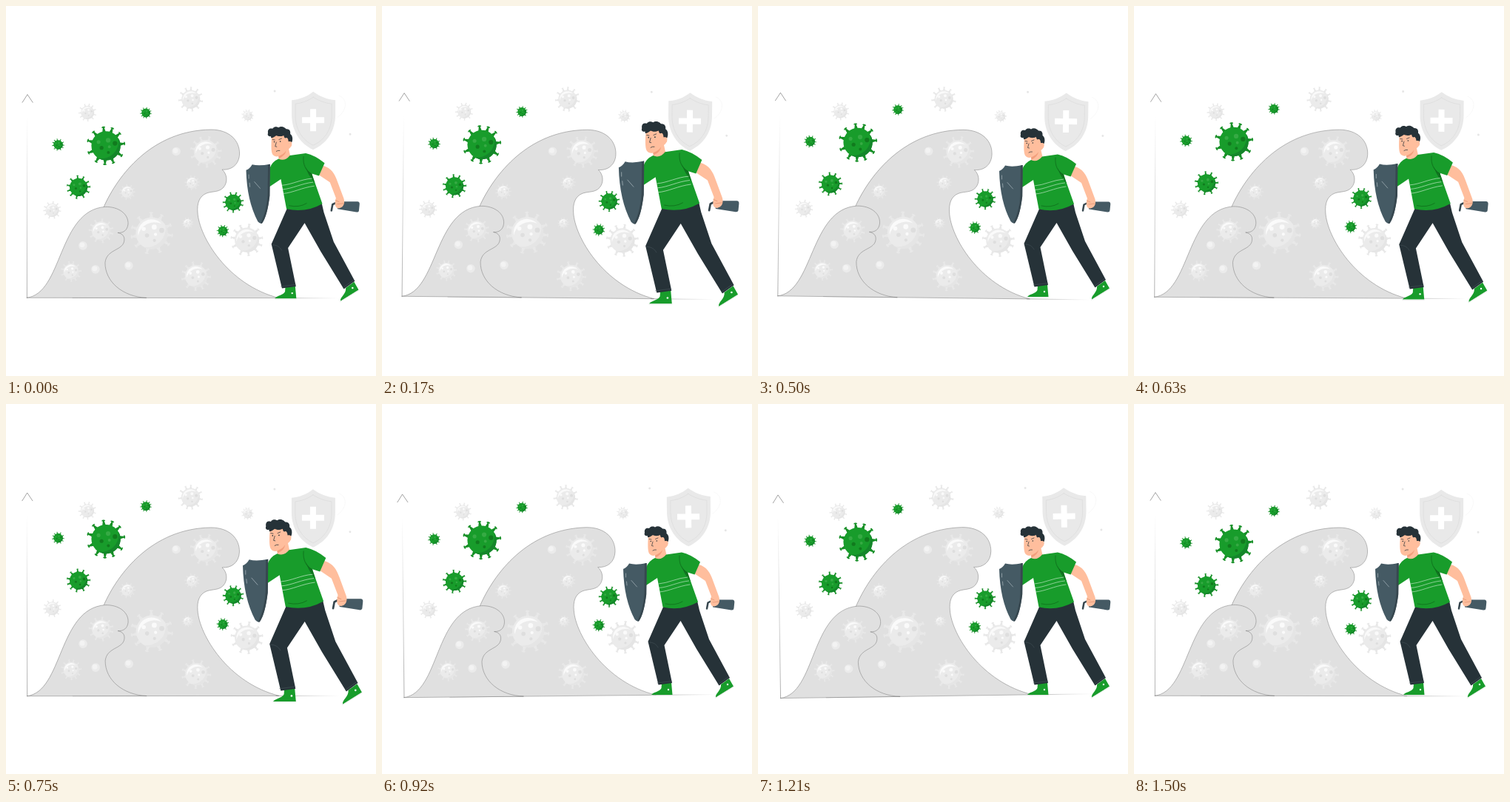
An HTML page for the animation above (1.54 s loop, 500x500 px).

```html
<!DOCTYPE html>
<html lang="en">
<head>
<meta charset="utf-8">
<title>Facing the wave</title>
<style>
html, body { margin: 0; width: 100%; height: 100%; overflow: hidden; background: #fff; }
svg { display: block; width: 100vw; height: 100vh; }
.line { fill: none; stroke-linecap: round; stroke-linejoin: round; }
</style>
</head>
<body>
<svg viewBox="0 0 500 500">
  <defs>
    <linearGradient id="fadeY" gradientUnits="userSpaceOnUse" x1="0" y1="150" x2="0" y2="394">
      <stop offset="0" stop-color="#777" stop-opacity="0"/>
      <stop offset="1" stop-color="#777"/>
    </linearGradient>
    <linearGradient id="fadeX" gradientUnits="userSpaceOnUse" x1="365" y1="0" x2="450" y2="0">
      <stop offset="0" stop-color="#777"/>
      <stop offset="1" stop-color="#888" stop-opacity="0"/>
    </linearGradient>
  </defs>

  <g id="scene">
    <g id="badge">
      <path fill="#e9e9e9" d="M415 115.500C407 122 397 126 386 127V147C386 169 398 186 415 194C433 186 445 169 445 147V127C434 126 424 122 415 115.500Z"/>
      <path class="line" stroke="#d9d9d9" stroke-width=".6" d="M415 123C408 128 400 131 391 132V148C391 166 400 181 415 188C431 181 440 166 440 148V132C431 131 423 128 415 123Z"/>
      <path fill="#fff" d="M411 139h8v11h11v8h-11v11h-8v-11h-11v-8h11Z"/>
      <path class="line" stroke="#f5f5f5" stroke-width=".7" d="M450 121C463 126 460 142 448 150"/>
      <circle cx="363" cy="115" r="1.500" fill="#e6e6e6"/>
      <circle cx="465" cy="173" r="1.500" fill="#e6e6e6"/>
    </g>
    <g id="airGerms"></g>
    <g fill="#e0e0e0" stroke="#777" stroke-width=".5" stroke-linejoin="round">
      <path d="M132 272C151 229 197 168 277 167C302 167 316 182 315.500 200C315 214 305 222 292 221C299 227 300 238 294 245C288 252 279 250 271 253C261 257 258 267 259 279C261 312 300 377 369 394.500H90Z"/>
      <path d="M28 394.500C77 389 70 276 134 271.500C152 271 166 281 165 295C164 303 159 307 151 306.500C159 308 161 313 159.500 319C156 331 136 329 134 347C134 373 158 393 190 394.500Z"/>
    </g>
    <g class="line" stroke-width=".6">
      <path stroke="url(#fadeY)" d="M28.400 150L28.500 394.500"/>
      <path stroke="url(#fadeX)" d="M365 394.500L450 394.600"/>
      <path stroke="#666" d="M22 130.500L28.800 119.800L36 130.500"/>
    </g>
    <g id="waveGerms"></g>
  </g>

  <g id="greenGerms"></g>

  <g id="man">
    <!-- shoes and trousers -->
    <path fill="#189c2b" d="M378 377L391 376.500L392.500 393H364C367 389 375 389 377.500 384Z"/>
    <path fill="#189c2b" d="M458 379L469 371L475 381.500L451 396.500C450 391 459 387 458 379Z"/>
    <path class="line" stroke="#dfe5e0" stroke-width=".8" d="M364 393.800H392.500M450.500 397.300L475 382.300"/>
    <circle cx="387" cy="386" r="1.200" fill="#fff"/>
    <circle cx="467" cy="379" r="1.200" fill="#fff"/>
    <path fill="#263238" d="M381 272L426 266L429 279L442 318L470 370L455.500 380.500L425 331L403.500 293L381.500 326L392 377L373.500 379.500L359.500 321Z"/>
    <path class="line" stroke="#49565d" stroke-width=".5" d="M372 377L391.500 374.500M454.500 378.500L468.500 368.500M361 322C367 322 371 325 373 329"/>
    <!-- arm and handle -->
    <path fill="#455a64" d="M447 264.500H473.500Q476.500 264.500 476.300 268L475.500 276Q475.300 279 472 278.500L447 274.500Z"/>
    <path class="line" stroke="#37474f" stroke-width="2.500" d="M445.500 266L440.500 268.500L439 276.500"/>
    <path fill="#ffbe9d" d="M428 217C439 220 443.500 228 447 238L455.500 261C457.500 268 454 273 449 273.500C444 274 442.500 268 445 260L437 239L422 229Z"/>
    <path class="line" stroke="#d98a68" stroke-width=".6" d="M444.500 263L449 265M447 268L455 267"/>
    <!-- head -->
    <path fill="#ffbe9d" d="M360 177C359 190 359 198 361 202C363 205 367 205.500 369 204.500L369.500 210Q376 215 384.500 204L382.500 195Q388 191 386 183L378 172H364Z"/>
    <path fill="#f29f7d" d="M369 204.500Q376 202 379 197Q378 204 369.500 207.500Z"/>
    <path fill="#263238" d="M355 174C354 168 358 167 361 168C364 164 368 166 369 166.500C373 163.500 378 167 379 168.500C384 168 385 172 384.500 175C388 177 388 183 386.500 186L382 185C382 181 380 179 378 180.500C376 180 376 177 376 177C371 179 368 178 366 177C362 180 358 182 359 178C355 179 354 176 355 174Z"/>
    <ellipse cx="384" cy="188.500" rx="2.500" ry="3.500" fill="#ffbe9d"/>
    <path class="line" stroke="#263238" stroke-width=".7" d="M361 182.500L364 183M369.500 182.500L373 181M366 186L364.500 191.500L366.500 192M366 198Q368 196.500 370.500 197"/>
    <circle cx="363.300" cy="185.500" r=".8" fill="#263238"/>
    <circle cx="371.300" cy="185" r=".8" fill="#263238"/>
    <!-- shirt -->
    <path fill="#189c2b" d="M369 208Q377 212 384 203.500L405 200.500Q417 203 430 213.500L422.500 230.500L413 227.500L418 242L427 267.500Q405 280 379.500 274.500L372 235L357 245L357 221Q360 212 369 208Z"/>
    <path fill="#107220" d="M403 213Q405 223 413 228L417 240Q407 229 403 213Z"/>
    <path class="line" stroke="#0f681a" stroke-width=".7" d="M402 205C401 216 405 224 413 228M383 270Q396 273 406 267"/>
    <path id="stripes" class="line" stroke="#d9f0dc" stroke-width=".6"/>
    <!-- hand shield -->
    <path fill="#455a64" d="M326 223Q331 221 334 215.500Q343 218 357.500 215L357 257Q354 284 347 293.500Q344 294 341.500 291Q327 264 326 223Z"/>
    <path fill="#37474f" d="M355 215.500L357.800 215L357.300 257Q354 284 347 293.500L345 293.500Q353 278 354.500 256Z"/>
    <path class="line" stroke="#a9b7bd" stroke-width=".7" d="M337 238.500L344.500 247M329.500 229V234M330.500 240L331 245"/>
  </g>
</svg>
<script>
const LOOP = 1540;
const CYCLE = 1500;
const byId = id => document.getElementById(id);

const GREEN = { body: "#189c2b", spike: "#168f26", shade: "#14862a", light: "#36aa44", dot: "#117a1e" };
const GREY = { body: "#ebebeb", spike: "#e8e8e8", shade: "#e5e5e5", light: "#fafafa", dot: "#dedede" };

const disc = (x, y, r, fill) => `<circle cx="${x}" cy="${y}" r="${r}" fill="${fill}"/>`;

// One tapered spike with a small cap, pointing right on a unit body.
const spike = `<path d="M.85-.14L1.25-.05V-.12Q1.34-.14 1.34 0T1.25.12V.05L.85.14Z"/>`;

function spikes(count, turn) {
  let out = "";
  for (let i = 0; i < count; i++) {
    const angle = turn + (i + 0.15 * Math.sin(i * 5 + turn)) * 360 / count;
    out += `<g transform="rotate(${angle})">${spike}</g>`;
  }
  return out;
}

// Unit germ scaled to radius r.
function germ(x, y, r, c) {
  let spots = "";
  for (let i = 0; i < 6; i++) {
    const a = i * 2.4 + 0.3, d = 0.25 + i * 0.08;
    spots += disc(d * Math.cos(a), d * Math.sin(a), 0.1 + i % 3 * 0.03, i % 2 ? c.dot : c.light);
  }
  const gloss = c === GREY
    ? `<path fill="${c.light}" d="M-.85 .15A.85 .85 0 0 1 .6-.6A1.05 1.05 0 0 0-.85 .15Z"/>` : "";
  return `<g transform="translate(${x} ${y}) scale(${r})">` +
    `<g fill="${c.spike}">${spikes(11, x * 7)}</g>` + disc(0, 0, 1, c.body) +
    `<path fill="${c.shade}" d="M.87-.5A1 1 0 0 1-.5 .87A1.2 1.2 0 0 0 .87-.5Z"/>` +
    gloss + spots + `</g>`;
}

const bubble = (x, y) => disc(x, y, 5.8, GREY.body) + disc(x - 1, y - 1, 3.4, "#f3f3f3");

const germs = (c, ...spots) => spots.map(([x, y, r]) => germ(x, y, r, c)).join("");

byId("airGerms").innerHTML = germs(GREY,
  [110, 144, 9], [249.5, 126, 12.5], [326.5, 148, 6.3], [62.5, 276, 9], [325.5, 316, 16.5]);
byId("waveGerms").innerHTML = germs(GREY,
  [270, 197, 16], [251.5, 239, 7.5], [164, 251.5, 8], [197, 307, 21.5],
  [245.5, 293.5, 5.8], [128.5, 304, 12.5], [88, 359, 10.5], [257, 365, 15]) +
  bubble(230, 196.5) + bubble(104, 324) + bubble(121, 356) + bubble(166, 351);
byId("greenGerms").innerHTML = germs(GREEN,
  [135, 189, 19.6], [98, 245, 12], [70.5, 187.5, 6.2],
  [189, 144.5, 5.8], [307, 265.5, 10.6], [293, 304, 6.2]);

let stripes = "";
for (let i = 0; i < 3; i++)
  stripes += `M${374 + i / 2} ${243 + i * 5.5}c13-1 25-8 ${39 + i}-${9 + i / 2}`;
byId("stripes").setAttribute("d", stripes);

const clamp = (v, lo, hi) => Math.min(hi, Math.max(lo, v));

// Linear swing 0, 1, 0, -1, 0 over one cycle.
const swing = t => 1 - Math.abs(4 * ((t / CYCLE + 0.25) % 1) - 2);
// Linear rise to 1 at the peak, then back to 0.
const pulse = (t, peak, rise, fall) =>
  Math.max(0, 1 - Math.abs(t - peak) / (t < peak ? rise : fall));

function draw(now) {
  const t = now % LOOP;
  const turn = clamp(-1.12 * -swing(t + 20), -1, 1);
  const lift = -6.6 * pulse(t, 735, 750, 765);
  const size = 1 + 0.1 * (pulse(t, 120, 150, 270) + pulse(t, 720, 130, 150));
  byId("scene").setAttribute("transform", `rotate(${turn} 250 250)`);
  byId("greenGerms").setAttribute("transform", `translate(0 ${lift})`);
  byId("man").setAttribute("transform", `translate(401 281) scale(${size}) translate(-401 -281)`);
}

let start;
function tick(now) {
  start ??= now;
  draw(Math.max(0, now - start));
  requestAnimationFrame(tick);
}
draw(0);
requestAnimationFrame(tick);
</script>
</body>
</html>
```
